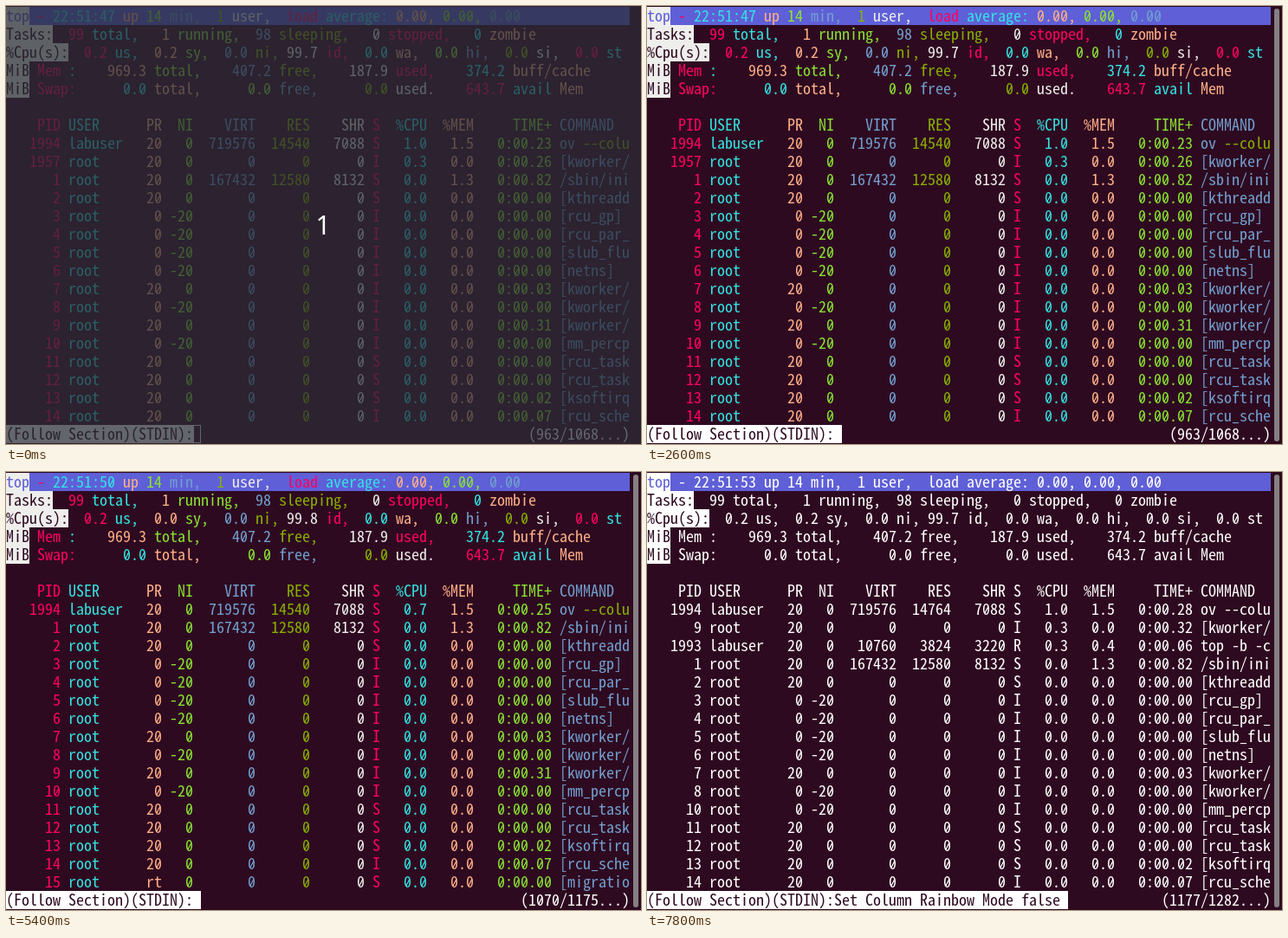
Write an HTML page that moves like this. It is 733 px wide and 506 px high and loops after 8000 ms.

```html
<!DOCTYPE html>
<html lang="en">
<head>
<meta charset="utf-8">
<title>Terminal: top in a pager</title>
<style>
  html, body { margin: 0; width: 100%; height: 100%; overflow: hidden; background: #2e0a20; }
  #stage {
    position: relative; width: 733px; height: 506px; overflow: hidden;
    font: 18px/19px 'Noto Sans Mono CJK JP', 'Noto Sans Mono', 'DejaVu Sans Mono', monospace;
    font-size-adjust: ch-width .5;
    font-variant-ligatures: none;
    color: #fff;
    animation: backdrop 8s step-end infinite;
  }
  #stage > * { position: absolute; }
  .screen { left: 0; top: 1px; width: 720px; visibility: hidden; }
  .line { position: relative; height: 21px; white-space: pre; }
  .line b { font-weight: normal; }
  /* slash inside each zero */
  .line i {
    display: inline-block; font-style: normal;
    background: linear-gradient(to bottom right, transparent 40%, currentColor 42% 58%, transparent 60%)
      2.5px 6.5px / 4px 8px no-repeat;
  }
  .head { background: #5f5fd7; }
  .line .tag, .prompt { display: inline-block; height: 21px; vertical-align: top; background: #fff; color: #2e0a20; }
  .rainbow .tag { background: #eeeeec; }
  .line.head .tag { color: #5f5fd7; }
  .count { position: absolute; right: 0; top: 0; }

  .screen:nth-of-type(1) { animation: first 8s step-end infinite; }
  .screen:nth-of-type(2) { animation: second 8s step-end infinite; }
  .screen:nth-of-type(3) { animation: third 8s step-end infinite; }
  .screen:nth-of-type(4) { animation: fourth 8s step-end infinite; }

  #cursor {
    top: 484px; width: 9px; height: 21px; box-sizing: border-box;
    border: 1px solid #fff;
    animation: blink 8s step-end infinite, shift 8s step-end infinite;
  }
  #bar {
    left: 724px; top: 3px; width: 6px; height: 500px; border-radius: 3px;
    background: #858083; animation: focus 8s step-end infinite;
  }
  #dim {
    inset: 0; background: rgba(39, 43, 52, .72);
    font: 30px/42px 'Noto Sans', 'Open Sans', sans-serif; font-size-adjust: none;
    text-align: center; animation: dim 8s step-end infinite;
  }
  #dim span { position: absolute; left: 0; width: 732px; top: 232px; }

  @keyframes backdrop { 0% { background: #380c28; } 17.5%, 100% { background: #2e0a20; } }
  @keyframes first  { 0% { visibility: visible; } 33.75%, 100% { visibility: hidden; } }
  @keyframes second { 0% { visibility: hidden; } 33.75% { visibility: visible; } 68.75%, 100% { visibility: hidden; } }
  @keyframes third  { 0% { visibility: hidden; } 68.75% { visibility: visible; } 71.25%, 100% { visibility: hidden; } }
  @keyframes fourth { 0% { visibility: hidden; } 71.25%, 100% { visibility: visible; } }
  @keyframes blink {
    0% { background: transparent; border-color: #fff; }
    17.5%, 32.5%, 47.5%, 56.25%, 67.5%, 82.5%, 97.5%, 100% { background: #fff; border-color: #fff; }
    25%, 40%, 55%, 62.5%, 75%, 90% { background: transparent; border-color: transparent; }
  }
  @keyframes shift { 0% { left: 216px; } 68.75%, 100% { left: 477px; } }
  @keyframes focus { 0% { visibility: hidden; } 17.5%, 100% { visibility: visible; } }
  @keyframes dim   { 0% { visibility: visible; } 1.25%, 100% { visibility: hidden; } }
</style>
</head>
<body>
<div id="stage"></div>
<script>
const stage = document.getElementById('stage');
const rainbow = ['#ff005f', '#34e2e2', '#ffaf87', '#8ae234', '#729fcf', '#87af00', '#eeeeec'];

// Lays out one process row in the fixed columns of top.
function row(pid, user, pr, ni, virt, res, shr, state, cpu, mem, time, cmd) {
  return pid.padStart(7) + ' ' + user.padEnd(9) + pr.padStart(3) + ni.padStart(4) +
    virt.padStart(8) + res.padStart(7) + shr.padStart(7) + ' ' + state +
    cpu.padStart(6) + mem.padStart(6) + time.padStart(10) + ' ' + cmd;
}
const parse = text => row(...text.split('|'));

function kernel(pid, kind, state, time, cmd, cpu = '0.0') {
  const [pr, ni] = { n: ['20', '0'], h: ['0', '-20'], r: ['rt', '0'] }[kind];
  return row(String(pid), 'root', pr, ni, '0', '0', '0', state, cpu, '0.0', '0:00.' + time, cmd);
}

const base = [
  parse('1|root|20|0|167432|12580|8132|S|0.0|1.3|0:00.82|/sbin/ini'),
  kernel(2, 'n', 'S', '00', '[kthreadd'),
  kernel(3, 'h', 'I', '00', '[rcu_gp]'),
  kernel(4, 'h', 'I', '00', '[rcu_par_'),
  kernel(5, 'h', 'I', '00', '[slub_flu'),
  kernel(6, 'h', 'I', '00', '[netns]'),
  kernel(7, 'n', 'I', '03', '[kworker/'),
  kernel(8, 'h', 'I', '00', '[kworker/'),
  kernel(9, 'n', 'I', '31', '[kworker/'),
  kernel(10, 'h', 'I', '00', '[mm_percp'),
  kernel(11, 'n', 'S', '00', '[rcu_task'),
  kernel(12, 'n', 'S', '00', '[rcu_task'),
  kernel(13, 'n', 'S', '02', '[ksoftirq'),
  kernel(14, 'n', 'I', '07', '[rcu_sche'),
  kernel(15, 'r', 'S', '00', '[migratio')
];
const pager = (res, cpu, time) =>
  parse(`1994|labuser|20|0|719576|${res}|7088|S|${cpu}|1.5|0:00.${time}|ov --colu`);

function report(clock, sy, idle, procs) {
  return [
    `top - 22:51:${clock} up 14 min,  1 user,  load average: 0.00, 0.00, 0.00`,
    'Tasks:  99 total,   1 running,  98 sleeping,   0 stopped,   0 zombie',
    `%Cpu(s):  0.2 us,  ${sy} sy,  0.0 ni, ${idle} id,  0.0 wa,  0.0 hi,  0.0 si,  0.0 st`,
    'MiB Mem :    969.3 total,    407.2 free,    187.9 used,    374.2 buff/cache',
    'MiB Swap:      0.0 total,      0.0 free,      0.0 used.    643.7 avail Mem',
    '',
    parse('PID|USER|PR|NI|VIRT|RES|SHR|S|%CPU|%MEM|TIME+|COMMAND'),
    ...procs
  ].slice(0, 23);
}

const at47 = report(47, '0.2', '99.7', [
  pager(14540, '1.0', 23), kernel(1957, 'n', 'I', '26', '[kworker/', '0.3'), ...base
]);
const at50 = report(50, '0.0', '99.8', [pager(14540, '0.7', 25), ...base]);
const at53 = report(53, '0.2', '99.7', [
  pager(14764, '1.0', 28),
  kernel(9, 'n', 'I', '32', '[kworker/', '0.3'),
  parse('1993|labuser|20|0|10760|3824|3220|R|0.3|0.4|0:00.06|top -b -c'),
  ...base.filter((_, i) => i !== 8)
]);

function add(parent, name, cls, text = '') {
  const el = document.createElement(name);
  el.className = cls;
  el.innerHTML = text.replace(/0/g, '<i>0</i>');
  return parent.appendChild(el);
}

// A word at column 0 is a tag; the words after it cycle through the colours.
function drawLine(screen, text, index, colored) {
  const line = add(screen, 'div', index ? 'line' : 'line head');
  let n = 0;
  text.split(/(\s+)/).forEach((part, i) => {
    if (!part) return;
    if (!part.trim()) line.append(part);
    else if (i === 0) add(line, 'b', 'tag', part);
    else {
      const word = add(line, 'b', '', part);
      if (colored) word.style.color = rainbow[n++ % rainbow.length];
    }
  });
}

function drawScreen(lines, colored, message, count) {
  const screen = add(stage, 'div', colored ? 'screen rainbow' : 'screen');
  lines.forEach((text, i) => drawLine(screen, text, i, colored));
  const status = add(screen, 'div', 'line');
  add(status, 'span', 'prompt', '(Follow Section)(STDIN):' + message);
  add(status, 'span', 'count', `(${count}...)`);
}

const note = 'Set Column Rainbow Mode false';
drawScreen(at47, true, '', '963/1068');
drawScreen(at50, true, '', '1070/1175');
drawScreen(at50, false, note, '1070/1175');
drawScreen(at53, false, note, '1177/1282');

for (const id of ['cursor', 'bar', 'dim']) add(stage, 'div', '').id = id;
add(document.getElementById('dim'), 'span', '', '1');
</script>
</body>
</html>
```
